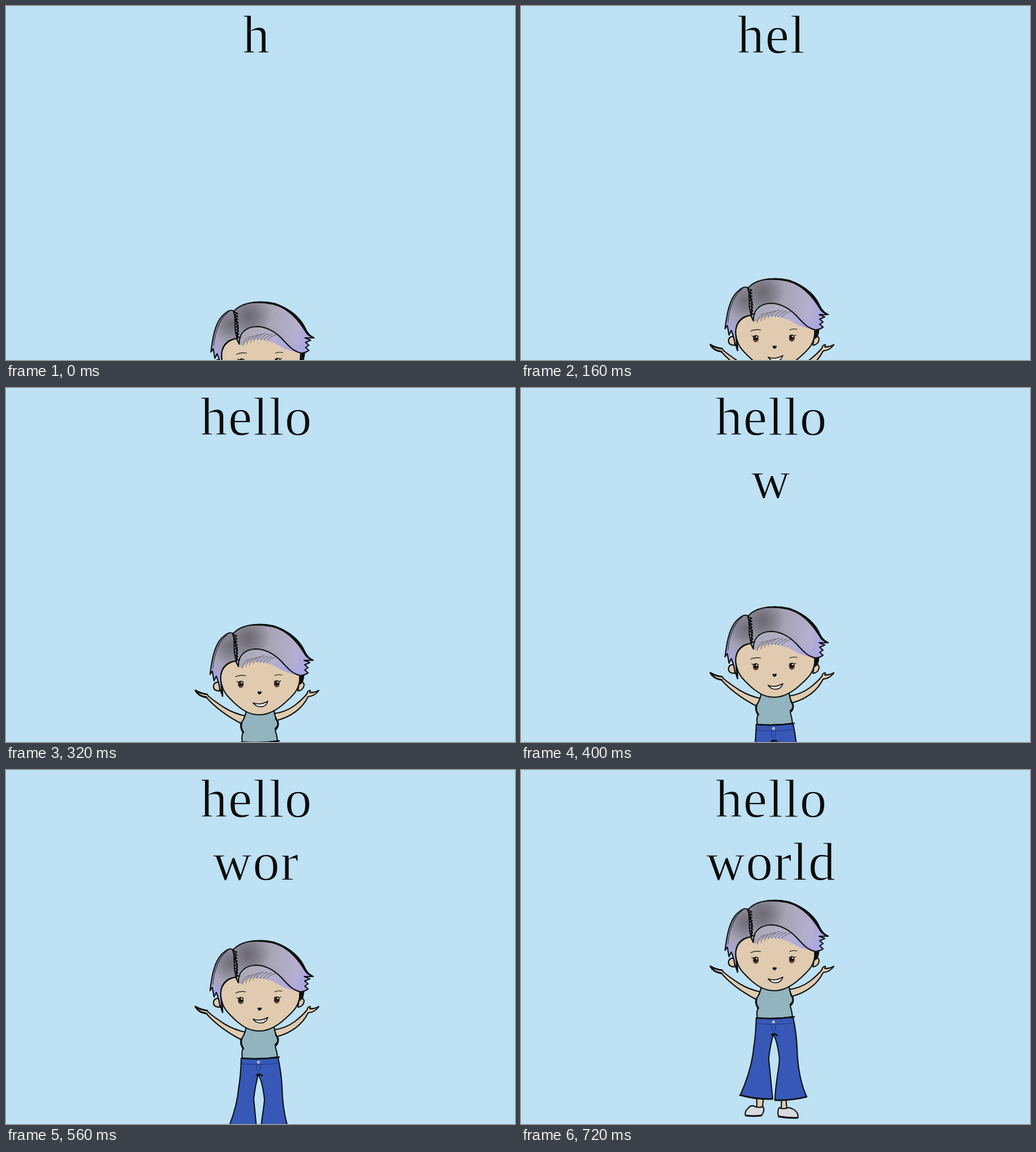
Animation of 898x624 px, one loop 1.12 s. Source, as an HTML page:

```html
<!DOCTYPE html>
<html lang="en">
<head>
<meta charset="utf-8">
<title>hello world</title>
<style>
  html, body { margin: 0; width: 100%; height: 100%; overflow: hidden; background: #bee1f4; }
  svg { display: block; width: 898px; height: 624px; }
  /* the background-coloured stroke thins the letters */
  text { font: 95px "Liberation Serif", "Times New Roman", serif; letter-spacing: 1.6px; text-anchor: middle; fill: #0a0c0b; stroke: #bee1f4; stroke-width: 1.3; }
  #girl { fill: none; stroke: #0d100f; stroke-width: 2.1; stroke-linejoin: round; stroke-linecap: round; }
  .skin { fill: #e0cbb0; }
  .shirt { fill: #92b4bf; }
  .jeans { fill: #3758b7; }
  .shoe { fill: #dad9df; }
  .fine { stroke-width: 1.1; }
  .seam { stroke: #1f3683; stroke-width: 1; }
  .ink { fill: #0d100f; }
  .dot { stroke: none; }
</style>
</head>
<body>
<svg viewBox="0 0 898 624">
  <defs>
    <radialGradient id="top" gradientUnits="userSpaceOnUse" cx="426" cy="254" r="114">
      <stop offset="0" stop-color="#6c6974"/>
      <stop offset=".15" stop-color="#7f7c89"/>
      <stop offset=".36" stop-color="#a5a2b4"/>
      <stop offset=".75" stop-color="#b2adca"/>
      <stop offset="1" stop-color="#aca7e4"/>
    </radialGradient>
    <radialGradient id="side" gradientUnits="userSpaceOnUse" cx="397" cy="268" r="84">
      <stop offset="0" stop-color="#706d77"/>
      <stop offset=".2" stop-color="#858291"/>
      <stop offset=".42" stop-color="#a5a2b6"/>
      <stop offset=".7" stop-color="#aaa5dc"/>
      <stop offset="1" stop-color="#aaa6ee"/>
    </radialGradient>
    <linearGradient id="fringe" gradientUnits="userSpaceOnUse" x1="412" y1="290" x2="520" y2="318">
      <stop offset="0" stop-color="#aaa8b4"/>
      <stop offset=".5" stop-color="#b5b0cb"/>
      <stop offset="1" stop-color="#a7a3f0"/>
    </linearGradient>
  </defs>

  <text id="line1" x="442" y="83"></text>
  <text id="line2" x="441.3" y="194"></text>

  <g id="girl">
    <!-- legs and shoes -->
    <path class="skin" d="M416 576V595H426L428 576ZM460 578L459 597H469L467 578Z"/>
    <path class="shoe" d="M396 609Q394 602 400 597Q404 591 410 592Q419 597 427 593Q431 601 424 609Q410 611 396 609Z"/>
    <path class="shoe" d="M454 610Q452 599 456 595Q462 599 472 595Q482 597 487 604Q490 610 488 613Q470 613 454 610Z"/>
    <path d="M397 609Q410 611 424 609M455 611Q472 614 488 613" stroke-width="3"/>

    <!-- jeans -->
    <path class="jeans" d="M415 437Q414 470 410.5 489C408 520 398 548 387 573Q413 580 444 580Q441 548 437 509Q439 489 445 466Q452 476 456 509C455 530 449 550 448 582Q477 583 504 576C493 552 488 526 487 489Q486 464 480 436Z"/>
    <path d="M386 573Q413 581 444 580M448 582Q477 583 504 576M442 467Q447 463 452 468" stroke-width="2.6"/>
    <path class="seam" d="M416 447Q448 450 481 446M442 448V457Q445 461 449 456V448"/>
    <circle class="dot" cx="445.5" cy="444" r="2.6" fill="#c0bcbc"/>

    <!-- arms -->
    <path class="skin" d="M422 391Q403 387 386 377Q366 364 357 356L355 353Q345 352 334 346Q339 356 354 359C370 377 389 391 416 405Z"/>
    <path d="M334 346Q344 352 355 353M334 346Q340 357 354 358" stroke-width="2.7"/>
    <path class="skin" d="M473 387Q494 384 510 372Q524 361 531 352Q532 346 537 346L536 350Q545 350 552 346Q545 356 533 357C523 378 502 393 478 399Z"/>

    <!-- shirt -->
    <path class="shirt" d="M424 382Q421 397 415 403Q412 411 418 420Q415 427 417 437Q448 440 479 435Q478 425 475 416Q482 411 480 401Q475 397 473 382Z"/>
    <path d="M416 437Q448 440 482 435M416 403Q413 411 419 420M476 396Q484 407 475 413" stroke-width="2.6"/>

    <!-- ears and face -->
    <path class="skin" d="M377 332Q367 330 366 339Q366 347 377 347ZM517 334Q524 328 526 336Q525 346 515 347Z"/>
    <path class="skin" d="M406 294C388 297 377 310 379 328C381 348 392 358 406 371C421 384 432 389 447 389C464 389 478 381 493 367C509 353 518 344 519 320L470 280Z"/>
    <path class="ink" d="M518 321L526 319Q525 328 523 332L518 336Z" stroke-width="1"/>

    <!-- features -->
    <g id="eye">
      <ellipse class="dot" cx="414.3" cy="335.5" rx="5" ry="6" fill="#39251a"/>
      <ellipse class="dot" cx="414.8" cy="338" rx="3.2" ry="2.4" fill="#6b4a34"/>
      <circle class="dot ink" cx="414.5" cy="335.5" r="2.5"/>
      <circle class="dot" cx="415.8" cy="332.5" r="1.3" fill="#fff"/>
      <path class="fine" d="M409.5 332Q414 328 419 331.5"/>
    </g>
    <use href="#eye" x="63.5" y="-1"/>
    <path class="fine" d="M410 332L407 330M482 331L485 329M405 322Q413 318 423 320M474 320Q480 317 487 319"/>
    <path class="ink" d="M444 349Q446 347 447 349Q449 347 451 349Q449 353 447 353Z" stroke-width="1"/>
    <path d="M436 368Q449 373 462 365Q459 375 449 375Q441 375 436 368Z" fill="#fff" stroke-width="1.6"/>

    <!-- hair -->
    <path fill="url(#side)" d="M402 246Q394 242 386 249C370 260 364 284 360 318L364 312L367 329L371 321Q375 330 377 342L382 356Q380 341 379 329C377 309 387 296 406 294L403 280Z"/>
    <path class="fine" d="M391 247C376 258 367 282 365 307" opacity=".8"/>
    <path d="M381 338L382 356" stroke-width="2.8"/>
    <path class="dot" fill="url(#fringe)" d="M410 305Q411 281 439 272Q470 272 490 295L520 320Q493 316 474 303Q451 294 434 296Q421 299 416 306Z"/>
    <path fill="url(#top)" d="M400 247C410 234 429 230 447 230C483 230 513 252 526 276Q532 289 542 293L526 293L536 297L527 301L533 306L527 310L533 315L528 318L520 320C506 318 496 306 485 294C471 280 457 273 440 273C421 274 409 286 410 304L406 296L408 274Z"/>
    <g id="shine" stroke="#cbc6df" stroke-width=".8" opacity=".45"></g>
    <g id="strands" stroke="#55535f" stroke-width=".9"></g>
    <path class="ink" d="M425 232Q447 226 473 232C502 242 521 260 528 279Q533 289 542 293Q531 291 526 281C512 258 494 240 470 234Q446 229 425 232Z" stroke-width="1.2"/>
    <path id="part" stroke-width="2"/>
  </g>
</svg>
<script>
const $ = id => document.getElementById(id);
const range = n => [...Array(n).keys()];
const setPaths = (id, list) => $(id).innerHTML = list.map(d => `<path d="${d}"/>`).join('');

setPaths('strands', range(8).map(i =>
  `M${417 + i * 6.2} ${307 - Math.min(i, 4) * 2.6}q${1 + i * .4} ${i - 13} ${12 + i * .4} ${i - 16}`));
setPaths('shine', range(9).map(i =>
  `M${455 + i * 2.5} ${269 - i * 4}Q${490 + i} ${270 - i * 3} ${512 + i * .8} ${305 - i * 3.5}`));

// wavy parting
$('part').setAttribute('d', 'M400 247' + range(9).map(i =>
  `L${407 + i * .3} ${250 + i * 5.2}L${402 + i * .4} ${252.6 + i * 5.2}`).join(''));

const STEP = 80, LOOP = 1120;
const drop = [292, 272, 251, 219, 187, 156, 124, 71, 49.5, 0];

function draw(now) {
  const k = Math.min(9, Math.floor(now % LOOP / STEP));
  $('line1').textContent = 'hello'.slice(0, k + 1);
  $('line2').textContent = 'world'.slice(0, Math.max(0, k - 4));
  $('girl').setAttribute('transform', `translate(${k ? 0 : 1.5} ${drop[k]})`);
}

let start;
function tick(now) {
  start ??= now;
  draw(now - start);
  requestAnimationFrame(tick);
}
draw(0);
requestAnimationFrame(tick);
</script>
</body>
</html>
```
